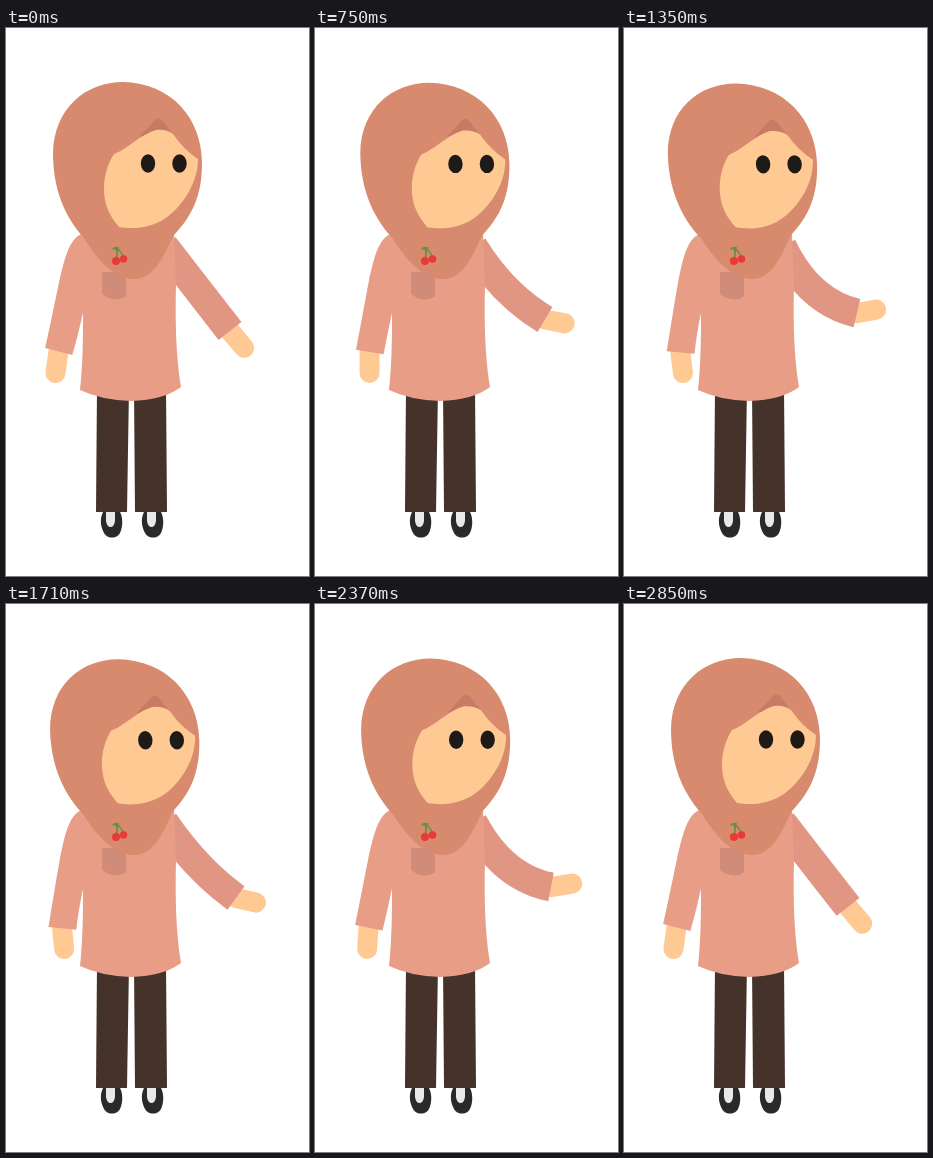
Recreate the animation shown at these times as an HTML page. Size 303 by 548 pixels, loop 2880 ms.

```html
<!DOCTYPE html>
<html lang="en">
<head>
<meta charset="utf-8">
<title>Waving girl</title>
<style>
html, body { margin: 0; width: 100%; height: 100%; overflow: hidden; background: #fff; }
svg { display: block; width: 100%; height: 100%; }
</style>
</head>
<body>
<svg viewBox="0 0 303 548">
  <g fill="#44322b">
    <path d="M91 360H123L121 484H90Z"/>
    <path d="M128 360H160L161 484H129Z"/>
  </g>
  <g id="shoe">
    <path fill="#2b2a2b" d="M97 484H114C117 490 117 498 114 505C111 511 101 511 98 505C94 498 94 490 97 484Z"/>
    <path fill="#e9e9e8" d="M100 484H109V493Q108 499 104.500 499Q101 499 100 493Z"/>
  </g>
  <use href="#shoe" x="41"/>

  <g fill="none" stroke="#ffc993" stroke-width="20" stroke-linecap="round">
    <path id="leftHand"/>
    <path id="rightHand"/>
  </g>
  <path id="leftSleeve" fill="#e89d86"/>
  <path id="rightSleeve" fill="none" stroke="#e19683" stroke-width="29"/>

  <path fill="#e89d86" d="M76 206H168L170 258C169 292 170 330 175 359Q158 372 125 373Q95 372 74 362C77 335 77 310 77 283Z"/>
  <path fill="#d08c78" d="M96 244H120V268Q116 271.500 109 271.500Q99 270 96 265Z"/>

  <g id="head">
    <path fill="#d88a6e" d="M47 125C48 80 80 54 117 54C165 55 196 90 196 135C196 168 186 188 168 207C160 222 150 252 127 251C105 250 88 226 78 210C58 188 47 160 47 125Z"/>
    <path fill="#c67b66" d="M134 108Q142 100 149 92Q153 88 157 93L168 108Z"/>
    <path fill="#ffc993" d="M113 199C104 188 98 178 98 160C98 148 102 135 108 126C120 122 135 106 150 102Q160 101 167 106Q178 122 192 131C192 160 170 185 155 193C140 201 125 201 113 199Z"/>
    <g fill="#1e1a17">
      <ellipse cx="142" cy="135.500" rx="7.200" ry="9.200"/>
      <ellipse cx="173.500" cy="135.500" rx="7.200" ry="9.200"/>
    </g>
  </g>

  <path fill="none" stroke="#5a8f3c" stroke-width="1.400" d="M110 231Q112 226 110.500 220.500Q115 223 117.500 229"/>
  <path fill="#5a9a3a" d="M106 221Q109 217 114 220Q110 223 106 221Z"/>
  <g fill="#e83a36">
    <circle cx="110" cy="233" r="4"/>
    <circle cx="117.500" cy="231" r="3.800"/>
  </g>
</svg>
<script>
const LOOP = 2880, STEP = 30;
// time, wrist x, wrist y, forearm angle, hand angle, hand length
const KEYS = [
  [0, 224, 303, 52, 50, 22],
  [750, 230, 291.5, 31, 11, 20],
  [1320, 233, 285, 13, -11, 19.5],
  [1710, 230, 294, 36, 13, 20.5],
  [2160, 233.5, 285, 15, -5, 21],
  [2370, 236, 283, 11, -9, 21.5],
  [2580, 231, 287, 17, -3, 20],
  [2865, 224, 303, 52, 50, 22]
];
const get = id => document.getElementById(id);
const draw = (id, d) => get(id).setAttribute('d', d);
const polar = (deg, r) => [r * Math.cos(deg * Math.PI / 180), r * Math.sin(deg * Math.PI / 180)];
const mix = (a, b, k) => a + (b - a) * k;

// Smooth slope at a key; flat at extremes and at both ends
function slope(i, p) {
  const a = KEYS[i - 1], b = KEYS[i], c = KEYS[i + 1];
  if (!a || !c || (b[p] - a[p]) * (c[p] - b[p]) <= 0) return 0;
  return (c[p] - a[p]) / (c[0] - a[0]);
}

function pose(t) {
  t = Math.min(t, KEYS[KEYS.length - 1][0]);
  const i = Math.max(1, KEYS.findIndex(k => k[0] >= t));
  const a = KEYS[i - 1], b = KEYS[i], span = b[0] - a[0], u = (t - a[0]) / span;
  return [1, 2, 3, 4, 5].map(p =>
    mix(a[p], b[p], u * u * (3 - 2 * u)) +
    span * u * (1 - u) * ((1 - u) * slope(i - 1, p) - u * slope(i, p)));
}

function render(t) {
  const sway = (1 - Math.cos(2 * Math.PI * t / LOOP)) / 2;

  // Head leans about the tip of the scarf
  const lean = 5 * sway / 195, dip = 1.4 * sway / 195;
  get('head').setAttribute('transform', `matrix(1 0 ${lean} ${1 - dip} ${-250 * lean} ${250 * dip})`);

  const [x, y, forearm, hand, length] = pose(t);
  const [ex, ey] = polar(forearm, 50), [hx, hy] = polar(hand, length);
  draw('rightSleeve', `M158 218Q${x - ex} ${y - ey} ${x} ${y}`);
  draw('rightHand', `M${x} ${y}L${x + hx} ${y + hy}`);

  const cx = mix(52.7, 56.7, sway), cy = mix(323.5, 324.5, sway);
  const [dx, dy] = polar(mix(14, 5, sway), 14);
  draw('leftSleeve', `M76 206C58 212 55 250 ${cx - dx} ${cy - dy}L${cx + dx} ${cy + dy}Q72 308 78 280L100 206Z`);
  draw('leftHand', `M${cx - 0.3} ${cy}L${mix(49.5, 59, sway)} 345`);
}

function tick(now) {
  render(Math.floor(now % LOOP / STEP) * STEP);
  requestAnimationFrame(tick);
}
render(0);
requestAnimationFrame(tick);
</script>
</body>
</html>
```
